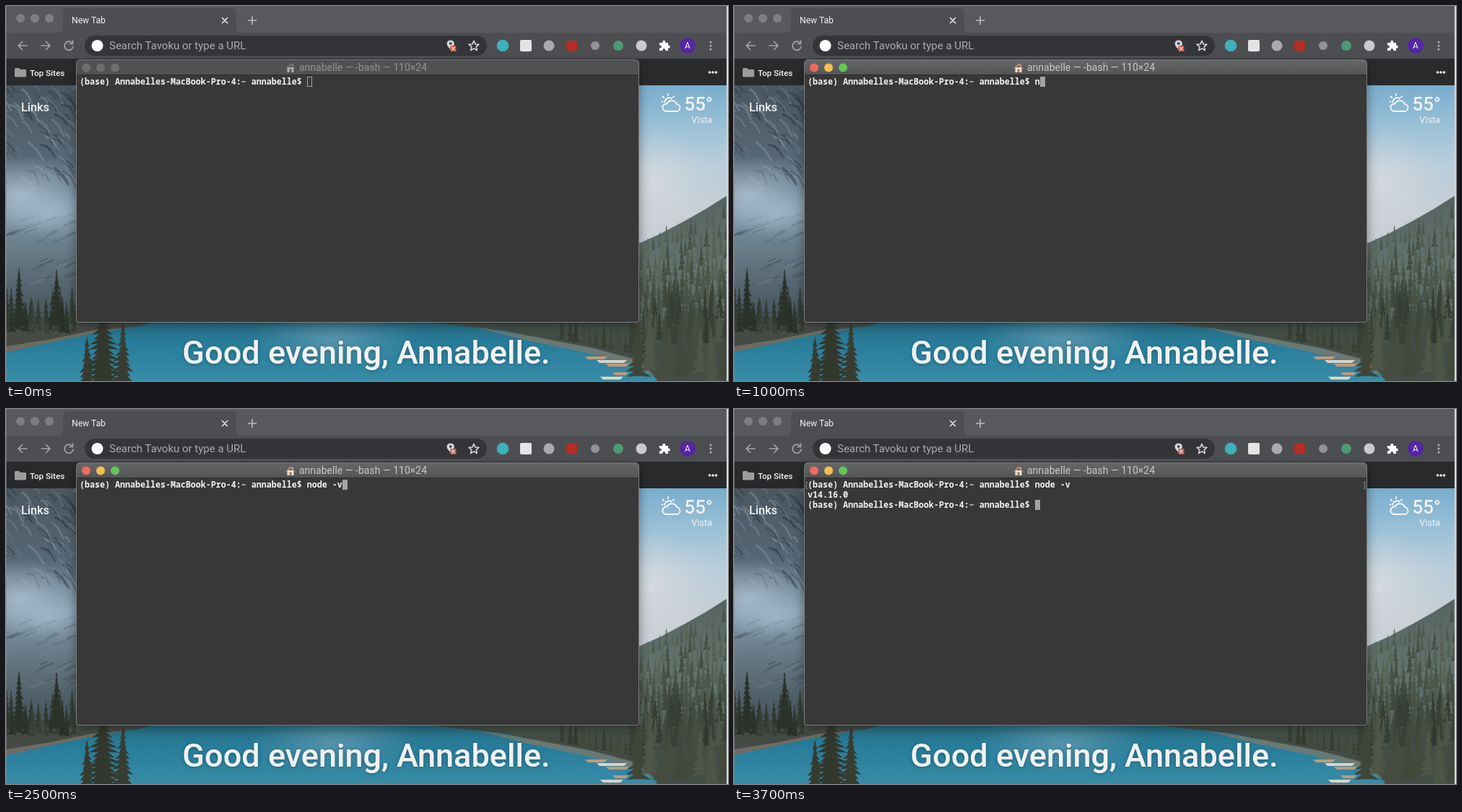
An HTML page that plays this animation: 1000x520 px, repeating every 3800 ms.

```html
<!DOCTYPE html>
<html lang="en">
<head>
<meta charset="utf-8">
<title>Terminal</title>
<style>
html, body { margin: 0; width: 100%; height: 100%; overflow: hidden; background: #292a2c; }
svg { display: block; position: absolute; left: 0; top: 0; }
text { font-family: Roboto, Inter, sans-serif; fill: #f1f2f3; white-space: pre; }
.mono { font: 600 11.67px "Noto Sans Mono", "DejaVu Sans Mono", monospace; fill: #f4f4f4; }
.mark { font: 400 11.67px "Noto Sans Mono", "DejaVu Sans Mono", monospace; fill: #8f8f8f; }
.line { fill: none; stroke-linecap: round; stroke-linejoin: round; }
</style>
</head>
<body>
<svg width="1000" height="520" viewBox="0 0 1000 520">
  <defs>
    <linearGradient id="sky" x2="0" y2="1">
      <stop offset="0" stop-color="#76abcd"/><stop offset=".15" stop-color="#9bc1d7"/>
      <stop offset=".28" stop-color="#bacedb"/><stop offset=".45" stop-color="#c8cfd5"/>
    </linearGradient>
    <linearGradient id="cliff" x2="0" y2="1">
      <stop offset="0" stop-color="#4a5660"/><stop offset=".25" stop-color="#566775"/>
      <stop offset=".42" stop-color="#7d98ab"/><stop offset=".6" stop-color="#62747f"/>
      <stop offset=".8" stop-color="#43505a"/>
    </linearGradient>
    <linearGradient id="hill" x2="0" y2="1">
      <stop offset="0" stop-color="#566361"/><stop offset=".4" stop-color="#62736f"/><stop offset="1" stop-color="#4b564d"/>
    </linearGradient>
    <linearGradient id="lake" x2="0" y2="1">
      <stop offset="0" stop-color="#286b81"/><stop offset=".35" stop-color="#277c99"/><stop offset="1" stop-color="#388ca8"/>
    </linearGradient>
    <radialGradient id="mist">
      <stop offset="0" stop-color="#b3c7d6" stop-opacity=".75"/><stop offset="1" stop-color="#a3b8c9" stop-opacity="0"/>
    </radialGradient>
    <radialGradient id="cloud">
      <stop offset="0" stop-color="#dcdddf" stop-opacity=".7"/><stop offset="1" stop-color="#d6d9dc" stop-opacity="0"/>
    </radialGradient>
    <linearGradient id="barFill" x2="0" y2="1">
      <stop offset="0" stop-color="#666769"/><stop offset="1" stop-color="#535456"/>
    </linearGradient>
    <filter id="soft" x="-10%" y="-10%" width="120%" height="125%"><feGaussianBlur stdDeviation="8"/></filter>
    <filter id="glow" x="-5%" y="-30%" width="110%" height="170%">
      <feDropShadow dx="0" dy="1" stdDeviation="2.5" flood-color="#000" flood-opacity=".3"/>
    </filter>
  </defs>

  <!-- landscape -->
  <rect x="500" y="105" width="500" height="415" fill="url(#sky)"/>
  <ellipse cx="895" cy="245" rx="85" ry="75" fill="url(#cloud)"/>
  <rect y="105" width="500" height="415" fill="url(#cliff)"/>
  <g id="rocks" class="line"></g>
  <ellipse cx="20" cy="262" rx="105" ry="55" fill="url(#mist)"/>
  <ellipse cx="60" cy="290" rx="70" ry="35" fill="url(#mist)" opacity=".7"/>
  <path d="M850 342 877 329 906 316 940 298 970 281 1000 262V520H850Z" fill="url(#hill)"/>
  <rect y="438" width="1000" height="82" fill="url(#lake)"/>
  <ellipse cx="455" cy="462" rx="120" ry="42" fill="url(#mist)" opacity=".45"/>
  <path d="M0 432H220L188 443 120 452 62 465 0 476Z" fill="#454a45"/>
  <path d="M0 472 62 462 120 450 170 446 110 456 50 469 0 480Z" fill="#6f6b60"/>
  <path d="M560 436H1000V520H905L870 491 810 474 745 462 690 450Z" fill="#434d46"/>
  <path d="M650 445 735 459 812 474 872 490 900 513 860 496 800 480 722 464Z" fill="#7d786a" opacity=".75"/>
  <g id="trees"></g>
  <g id="boats"></g>

  <text x="499" y="495.5" font-size="45" font-weight="500" text-anchor="middle" filter="url(#glow)">Good evening, Annabelle.</text>
  <text x="21" y="146" font-size="16.3" font-weight="500">Links</text>
  <text x="979" y="145" font-size="26" font-weight="500" text-anchor="end">55°</text>
  <text x="978" y="162" font-size="12.7" text-anchor="end">Vista</text>
  <g class="line" stroke="#f4f6f8" stroke-width="1.9">
    <path d="M914 146H928A5 5 0 0 0 929 136A7.3 7.3 0 0 0 915.5 135.5A5.3 5.3 0 0 0 914 146Z"/>
    <path d="M912.5 133A6 6 0 0 1 922 128.5M917 122V124M909.5 125.5 911 127M908.5 132.5H909.5M925 125.5 924 126.5"/>
  </g>

  <!-- browser -->
  <rect width="1000" height="38" fill="#58595c"/>
  <path d="M71 38Q79 38 79 30V11Q79 3 87 3H311Q319 3 319 11V30Q319 38 327 38Z" fill="#4d4e51"/>
  <rect y="37" width="1000" height="36" fill="#4d4e51"/>
  <rect y="73" width="1000" height="37" fill="#292a2c"/>
  <g fill="#7d7e80"><circle cx="20" cy="17" r="6"/><circle cx="40" cy="17" r="6"/><circle cx="60" cy="17" r="6"/></g>
  <text x="91" y="24" font-size="12.1">New Tab</text>
  <path class="line" d="M299.5 16.5 306.5 23.5M306.5 16.5 299.5 23.5" stroke="#e4e5e7" stroke-width="1.7"/>
  <path class="line" d="M335.5 20H346.5M341 14.5V25.5" stroke="#b9babc" stroke-width="1.7"/>
  <g class="line" stroke="#a3a4a6" stroke-width="1.7">
    <path d="M29 55H17M22.5 49.5 17 55 22.5 60.5"/>
    <path d="M49 55H61M55.5 49.5 61 55 55.5 60.5"/>
    <path d="M91.6 51.2A6 6 0 1 0 93 56.2M92.5 48V52.5H88"/>
  </g>
  <rect x="109" y="41" width="557" height="28" rx="14" fill="#343538"/>
  <circle cx="126.5" cy="55" r="8" fill="#fff"/>
  <text x="143" y="60" font-size="15" style="fill:#a9abae">Search Tavoku or type a URL</text>
  <path d="M616 61C613 57 610.5 55 610.5 52A5.3 5.3 0 0 1 621 52C621 55 619 57 616 61Z" fill="#d4d5d7"/>
  <circle cx="615.7" cy="52" r="1.8" fill="#343538"/>
  <rect x="615.5" y="55" width="8" height="8" rx="1" fill="#cf5941"/>
  <path class="line" d="M617.7 57.2 621.3 60.8M621.3 57.2 617.7 60.8" stroke="#fff" stroke-width="1.2"/>
  <path class="line" d="M648 48.3 650 52.9 655 53.3 651.2 56.6 652.4 61.5 648 58.9 643.6 61.5 644.8 56.6 641 53.3 646 52.9Z" stroke="#dcdddf" stroke-width="1.5"/>
  <circle cx="688" cy="55" r="8.3" fill="#3fb0ba"/>
  <rect x="712" y="47" width="16" height="16" rx="2" fill="#e4e4e4"/>
  <circle cx="752" cy="55" r="7.5" fill="#a9abad"/>
  <rect x="776" y="48" width="15" height="14" rx="3" fill="#b52d25"/>
  <circle cx="816" cy="55" r="6" fill="#929395"/>
  <circle cx="848" cy="55" r="7" fill="#4e9a76"/>
  <circle cx="880" cy="55" r="7.5" fill="#c9cacc"/>
  <path d="M905 51H909.3V49.8A2 2 0 0 1 913.3 49.8V51H917V54.5H917.8A2 2 0 0 1 917.8 58.5H917V62H913.3V61A2 2 0 0 0 909.3 61V62H905V58.3H906A1.9 1.9 0 0 0 906 54.5H905Z" fill="#fff"/>
  <circle cx="944" cy="55" r="11" fill="#5527a0"/>
  <text x="944" y="59.3" font-size="12" text-anchor="middle">A</text>
  <g fill="#b1b2b4"><circle cx="976" cy="50" r="1.5"/><circle cx="976" cy="55" r="1.5"/><circle cx="976" cy="60" r="1.5"/></g>
  <path d="M12 87.5Q12 86 13.5 86H18L20 88H26.5Q28 88 28 89.5V97Q28 98.5 26.5 98.5H13.5Q12 98.5 12 97Z" fill="#9c9d9f"/>
  <text x="33" y="97" font-size="11.7" font-weight="500">Top Sites</text>
  <g fill="#f2f2f2"><circle cx="974.5" cy="92" r="1.8"/><circle cx="979" cy="92" r="1.8"/><circle cx="983.5" cy="92" r="1.8"/></g>
  <path d="M.5 0V520" stroke="#8a8d90" stroke-opacity=".55"/>
  <rect x="998" width="2" height="520" fill="#d5d7d9"/>

  <!-- terminal -->
  <rect x="98" y="84" width="778" height="356" rx="6" opacity=".45" filter="url(#soft)"/>
  <path d="M97.5 438.5V80Q97.5 74.5 103 74.5H871Q876.5 74.5 876.5 80V438.5Z" fill="#383838"/>
  <path id="bar" d="M97.5 95.5V80Q97.5 74.5 103 74.5H871Q876.5 74.5 876.5 80V95.5Z"/>
  <path d="M98 95.5H876" stroke="#2b2b2c"/>
  <path d="M97.5 436V80Q97.5 74.5 103 74.5H871Q876.5 74.5 876.5 80V436Q876.5 438.5 874 438.5H100Q97.5 438.5 97.5 436Z" fill="none" stroke="#7b7c7e"/>
  <circle class="lamp" cx="111" cy="85.5" r="6"/>
  <circle class="lamp" cx="131" cy="85.5" r="6"/>
  <circle class="lamp" cx="151" cy="85.5" r="6"/>
  <g id="house">
    <path d="M389.5 85H398.5V92H389.5Z" fill="#ece4d2"/>
    <path d="M396 80H398V84H396ZM387.5 86.5 394 79.5 400.5 86.5 399.5 87.3 394 82 388.5 87.3Z" fill="#c2916d"/>
    <path d="M392.5 87.5H395.5V92H392.5Z" fill="#a1745a"/>
  </g>
  <text id="title" x="406" y="90.3" font-size="14">annabelle — -bash — 110×24</text>
  <g id="marks">
    <text class="mark" x="97" y="109">[</text>
    <text class="mark" x="870" y="109">]</text>
  </g>
  <text class="mono" x="102" y="109"></text>
  <text class="mono" x="102" y="123"></text>
  <text class="mono" x="102" y="137"></text>
  <rect id="cursor"/>
</svg>
<script>
const $ = id => document.getElementById(id);
const all = sel => [...document.querySelectorAll(sel)];
const set = (el, attrs) => { for (const k in attrs) el.setAttribute(k, attrs[k]); };
const add = (parent, tag, attrs) => {
  const el = document.createElementNS('http://www.w3.org/2000/svg', tag);
  set(el, attrs);
  parent.appendChild(el);
};

let seed = 7;
const rnd = (a = 0, b = 1) => {
  seed = (seed * 16807) % 2147483647;
  return a + (b - a) * seed / 2147483647;
};

// Conifer with jagged sides, standing on (x, y).
function fir(x, y, h, color, spread = .17) {
  const n = Math.max(4, Math.round(h / 7));
  const left = [], right = [];
  for (let i = 1; i <= n; i++) {
    const w = h * spread * i / n, ty = y - h + h * i / n;
    left.push([x - w * rnd(.6, 1.2), ty], [x - w * .35, ty - 1]);
    right.push([x + w * rnd(.6, 1.2), ty], [x + w * .35, ty - 1]);
  }
  const pts = [[x, y - h], ...right, ...left.reverse()];
  add($('trees'), 'path', { d: 'M' + pts.map(p => p.map(v => v.toFixed(1)).join(' ')).join('L') + 'Z', fill: color });
}
const green = (light, warm = 0) =>
  `rgb(${light + warm | 0},${light * 1.1 + 4 | 0},${light - warm | 0})`;

function scenery() {
  for (let i = 0; i < 110; i++) {
    const x = rnd(-20, 100), y = rnd(105, 240), l = rnd(6, 24);
    add($('rocks'), 'path', {
      d: `M${x} ${y}l${l * .5} ${l * rnd(.1, .5)}l${l * .4} ${l * rnd(.4, .9)}`,
      stroke: rnd() < .55 ? '#28323b' : '#8a9ba9',
      'stroke-width': rnd(.7, 3), opacity: rnd(.2, .55)
    });
  }
  for (let i = 0; i < 40; i++) {
    const x = rnd(-10, 95), y = rnd(295, 390), l = rnd(8, 22);
    add($('rocks'), 'path', {
      d: `M${x} ${y}l${l} ${-l * .4}`, stroke: rnd() < .6 ? '#36434d' : '#768893',
      'stroke-width': rnd(1, 3), opacity: .35
    });
  }
  // far forest on the right slope, darker towards the viewer
  for (let row = 0; row < 7; row++)
    for (let x = 868; x < 1005; x += rnd(5, 10)) {
      const y = 350 + row * 20 - (x - 877) * .48 * (1 - row / 7) + rnd(-5, 5);
      fir(x, y, rnd(15, 26) + row * 5, green(rnd(72, 100) - row * 4, 1));
    }
  for (let x = 770; x < 885; x += rnd(7, 12)) fir(x, 463 + (x - 770) * .2, rnd(24, 40), green(rnd(48, 66), 3));
  for (let x = 875; x < 1005; x += rnd(12, 22)) fir(x, rnd(505, 530), rnd(60, 108), green(rnd(52, 78), 4));
  // left shore
  for (let row = 0; row < 2; row++)
    for (let x = 0; x < 100; x += rnd(6, 11)) fir(x, 439 + row * 10 + rnd(0, 6), rnd(30, 60) - row * 8, green(rnd(40, 56)));
  fir(18, 444, 82, green(42));
  fir(70, 444, 80, green(42));
  fir(134, 532, 125, green(48, 3), .28);
  fir(162, 528, 92, green(52, 3), .22);
  fir(112, 530, 72, green(50, 3), .22);
  [[802, 486, 31], [818, 491, 42], [831, 496, 32], [823, 514, 32], [840, 508, 22]].forEach(([x, y, w], i) =>
    add($('boats'), 'path', { d: `M${x} ${y}h${w}l-4 4h${8 - w}Z`, fill: i % 2 ? '#d9d3c8' : '#c39a78' }));
}

const CELL = 7, LOOP = 3800;
const prompt = '(base) Annabelles-MacBook-Pro-4:~ annabelle$ ';
// start ms, command typed so far, window focused, solid cursor, lines finished
const steps = [
  [0, '', 0, 0, 0], [400, '', 1, 0, 0], [500, '', 1, 1, 0],
  [1000, 'n', 1, 1, 0], [1100, 'no', 1, 1, 0], [1300, 'nod', 1, 1, 0], [1400, 'node', 1, 1, 0],
  [1600, 'node ', 1, 1, 0], [2100, 'node -', 1, 1, 0], [2400, 'node -v', 1, 1, 0],
  [2900, 'node -v', 1, 1, 1], [3000, 'node -v', 1, 1, 2]
];
const lines = all('.mono'), lamps = all('.lamp');
const lit = ['#ed6a5e', '#f5bf4f', '#62c554'];
let shown;

function draw(step) {
  const [, typed, focus, solid, done] = step;
  lines[0].textContent = prompt + typed;
  lines[1].textContent = done > 1 ? 'v14.16.0' : '';
  lines[2].textContent = done > 1 ? prompt : '';
  $('marks').style.display = done ? '' : 'none';
  $('bar').style.fill = focus ? 'url(#barFill)' : '#505153';
  $('title').style.fill = focus ? '#c8c9ca' : '#929395';
  $('house').style.filter = focus ? '' : 'grayscale(1) brightness(.75)';
  lamps.forEach((el, i) => { el.style.fill = focus ? lit[i] : '#6d6e70'; });
  const col = done === 1 ? 0 : prompt.length + (done ? 0 : typed.length);
  const x = 102 + col * CELL, y = 98 + done * 14;
  set($('cursor'), solid
    ? { x, y, width: CELL, height: 14, fill: '#a3a3a3', stroke: 'none' }
    : { x: x + .5, y: y + .5, width: CELL - 1, height: 13, fill: 'none', stroke: '#a3a3a3' });
}

function tick() {
  const t = performance.now() % LOOP;
  const step = steps.findLast(s => s[0] <= t);
  if (step !== shown) draw(shown = step);
  requestAnimationFrame(tick);
}

scenery();
tick();
</script>
</body>
</html>
```
